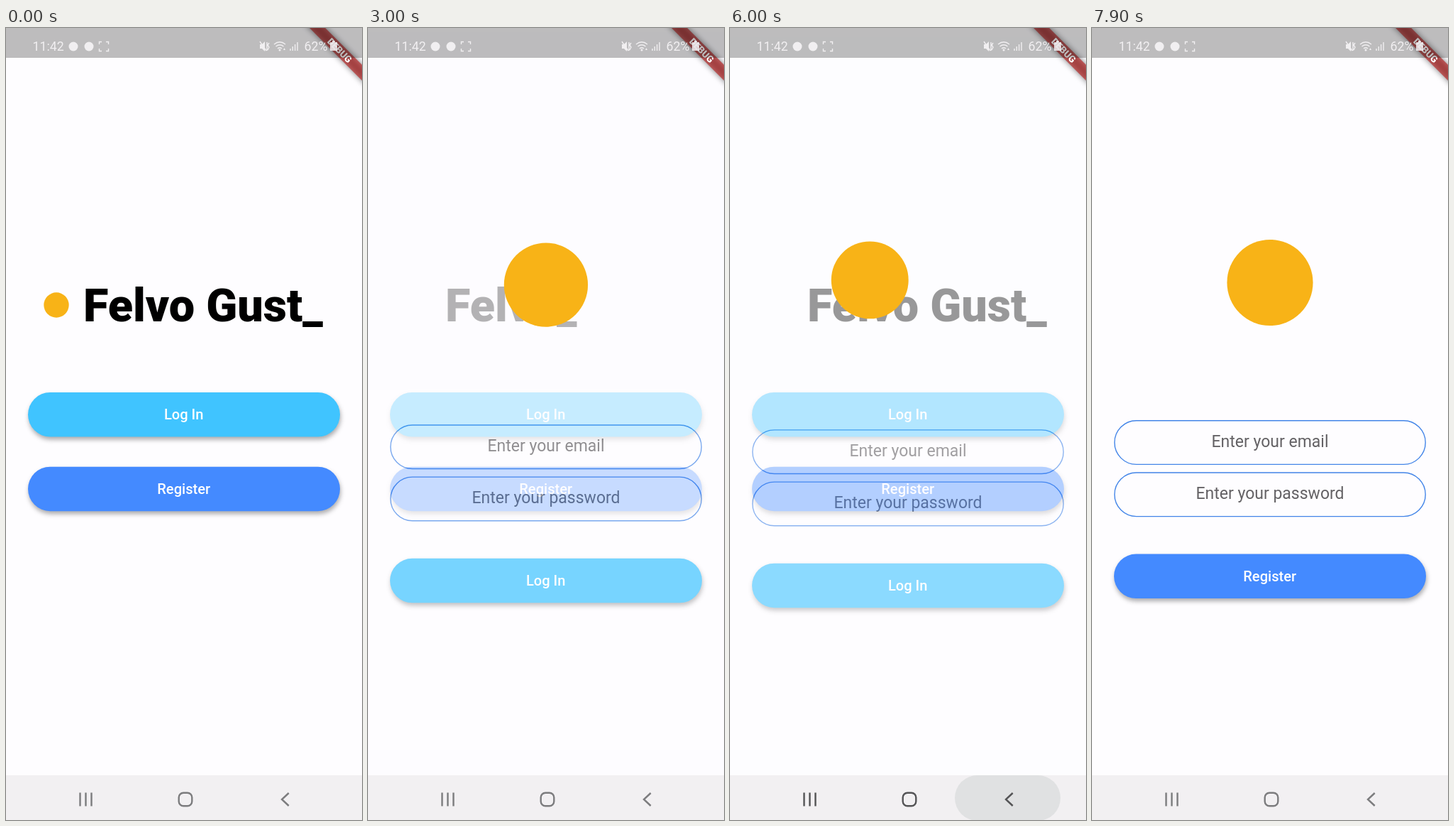
Recreate the animation shown at these times as an HTML page. Size 502 by 1115 pixels, loop 8000 ms.

```html
<!DOCTYPE html>
<html lang="en">
<head>
<meta charset="utf-8">
<title>Chat app sign-in</title>
<style>
  html, body { margin: 0; width: 100%; height: 100%; overflow: hidden; background: #fefdff; }
  svg { display: block; width: 100%; height: 100%; font-family: Roboto, sans-serif; }
  .bg { fill: #fefdff; }
  .button { filter: drop-shadow(1px 4px 3px rgba(0, 0, 0, .32)); }
  .cyan { fill: #40c4ff; }
  .blue { fill: #448aff; }
  .label { fill: #fff; font-size: 20.1px; font-weight: 500; text-anchor: middle; }
  .field { fill: none; stroke: #4385e8; stroke-width: 1.4; }
  .hint { fill: #646265; font-size: 23px; text-anchor: middle; }
  #title { font-size: 64.7px; font-weight: 900; }
  #logo { fill: #f8b317; }
  .status { fill: #f1eff1; font-size: 17.8px; }
  .thin { fill: none; stroke: #f1eff1; stroke-width: 1.4; }
  #nav { fill: none; stroke-width: 2.4; }
</style>
</head>
<body>
<svg viewBox="0 0 502 1115" preserveAspectRatio="none">
  <defs>
    <clipPath id="inkClip"><rect x="31" y="622" width="440" height="55" rx="27"/></clipPath>
    <filter id="soft" x="-20%" y="-150%" width="140%" height="400%"><feGaussianBlur stdDeviation="4"/></filter>
  </defs>

  <rect class="bg" width="502" height="1115"/>
  <g id="welcome">
    <text id="title" x="109" y="413"></text>
    <rect class="button cyan" x="31" y="513" width="440" height="62.5" rx="31.2"/>
    <text class="label" x="250.7" y="551">Log In</text>
    <rect class="button blue" x="31" y="617.7" width="440" height="62.5" rx="31.2"/>
    <circle id="ink" cx="252.5" cy="649" fill="#fff" clip-path="url(#inkClip)"/>
    <text class="label" x="250.7" y="656">Register</text>
  </g>

  <g id="form">
    <rect class="bg" width="502" height="1115"/>
    <rect class="field" x="31.8" y="552.8" width="438.4" height="61.6" rx="30.8"/>
    <text class="hint" x="251" y="589.5">Enter your email</text>
    <rect class="field" x="31.8" y="626" width="438.4" height="61.6" rx="30.8"/>
    <text class="hint" x="251" y="662.5">Enter your password</text>
    <rect id="submit" class="button" x="31" y="740.6" width="440" height="62.5" rx="31.2"/>
    <text id="submitLabel" class="label" x="250.7" y="778.5"></text>
  </g>

  <circle id="logo"/>

  <g transform="translate(502 0) rotate(45)">
    <rect x="-60" y="36.6" width="120" height="15.7" opacity=".5" filter="url(#soft)"/>
    <rect x="-60" y="36.6" width="120" height="15.7" fill="#b71c1c" opacity=".63"/>
    <text y="49.2" fill="#fff" font-size="13.3" font-weight="900" text-anchor="middle">DEBUG</text>
  </g>

  <rect width="502" height="42" opacity=".26"/>
  <g class="status">
    <text x="37.5" y="32">11:42</text>
    <circle cx="95" cy="26" r="6.5"/>
    <circle cx="117" cy="26" r="6.5"/>
    <path class="thin" d="M131.5 23v-3.5h3.5M141 19.5h3.5v3.5M144.5 29v3.5h-3.5M135 32.5h-3.5v-3.5"/>
    <g id="rec">
      <rect class="thin" x="134.2" y="23.5" width="5" height="5" rx="1"/>
      <path d="M139 26l2.5-2v4z"/>
    </g>
    <path d="M358 23h3l4-4v14l-4-4h-3z"/>
    <path class="thin" d="M358 19l9 13M368 20v12M371 21l-2 3 2 3-2 4"/>
    <path class="thin" d="M378 23q8-6.5 16 0M380.5 26q5.500-4.5 11 0M383 29q3-2.5 6 0"/>
    <circle cx="386" cy="31" r="1.5"/>
    <path d="M391 31l1.5-3 1.5 3z"/>
    <path class="thin" d="M401 32v-3M404.3 32v-6M407.6 32v-9M411 32V20"/>
    <text x="420.5" y="32">62%</text>
    <path d="M457 20h3v-2h4v2h3v12h-10z" opacity=".85"/>
  </g>

  <rect y="1052" width="502" height="63" fill="#f2f0f2"/>
  <rect id="press" x="317" y="1052" width="149" height="64" rx="32" fill="#e0e1e2"/>
  <g id="nav">
    <path d="M104.5 1076.500v19M112.5 1076.5v19M120.5 1076.5v19"/>
    <rect x="243.7" y="1076.7" width="18.6" height="18.6" rx="6.5"/>
    <path d="M398.7 1077l-9.700 9 9.700 9"/>
  </g>
</svg>

<script>
const LOOP = 8000, STEP = 100, FADE = 300, TYPE = 400;
const NAME = 'Felvo Gust';
const RISE = 1115 / 4;
const LOGIN = 2757, BACK = 5920, SIGNUP = 7127;
const CLEAR = [300, 6700];
const SMALL = { x: 71, y: 390, h: 68 };
const BIG = { x: 251, y: 358.5, h: 233 };

const el = id => document.getElementById(id);
const set = (id, attrs) => {
  for (const key in attrs) el(id).setAttribute(key, attrs[key]);
};
const clamp = v => Math.min(1, Math.max(0, v));
const ramp = (t, from, to) => clamp((t - from) / (to - from));
const mix = (a, b, p) => a + (b - a) * p;

function bezier(x1, y1, x2, y2) {
  const at = (a, b, s) => 3 * (1 - s) ** 2 * s * a + 3 * (1 - s) * s * s * b + s ** 3;
  return x => {
    if (x <= 0 || x >= 1) return clamp(x);
    let lo = 0, hi = 1;
    for (let i = 0; i < 24; i++) {
      const mid = (lo + hi) / 2;
      if (at(x1, x2, mid) < x) lo = mid; else hi = mid;
    }
    return at(y1, y2, lo);
  };
}
const slide = bezier(.4, 0, .2, 1);
const fadeIn = bezier(.42, 0, 1, 1);

// How far the form has opened, 0 to 1; the screen stalls until 3000 on the first opening.
function opened(t) {
  if (t < 3000) return 0;
  if (t < BACK) return ramp(t, LOGIN, LOGIN + FADE);
  if (t < SIGNUP) return 1 - ramp(t, BACK, BACK + FADE);
  return ramp(t, SIGNUP, SIGNUP + FADE);
}

// Typing restarts at each clear and stalls on the fifth letter before the form opens.
function letters(t) {
  if (t >= CLEAR[1]) return Math.floor((t - CLEAR[1]) / TYPE);
  if (t < CLEAR[0] || t >= LOGIN + 2 * FADE) return NAME.length;
  return Math.min(5, Math.floor((t - CLEAR[0]) / TYPE));
}

// The logo flies along an arc, leaving mostly sideways from either end.
function moveLogo(from, to, progress) {
  const s = slide(progress) ** 1.52;
  set('logo', {
    cx: mix(from.x, to.x, 1 - (1 - s) ** 2.3),
    cy: mix(from.y, to.y, s - 2.1 * s * (1 - s)),
    r: mix(from.h, to.h, s) * .26
  });
}

function draw(t) {
  const open = opened(t);
  const closing = t >= BACK && t < SIGNUP;
  const signUp = t >= CLEAR[1];
  const n = letters(t);

  el('title').textContent = n ? NAME.slice(0, n) + '_' : '';
  set('form', {
    opacity: fadeIn(open),
    transform: `translate(0 ${RISE * (1 - slide(open))})`
  });
  set('submit', { class: 'button ' + (signUp ? 'blue' : 'cyan') });
  el('submitLabel').textContent = signUp ? 'Register' : 'Log In';

  if (closing) moveLogo(BIG, SMALL, 1 - open);
  else moveLogo(SMALL, BIG, open);

  set('ink', {
    r: mix(20, 87.5, ramp(t, 7000, 7200)) + 60 * ramp(t, 7200, 7400),
    opacity: t < 7050 ? 0 : .17 * (1 - ramp(t, 7200, 7450))
  });
  set('rec', { opacity: t % 1000 >= 100 && t % 1000 < 600 ? 1 : 0 });
  set('press', { opacity: t < 5900 ? 0 : 1 - ramp(t, 6000, 6215) });

  const dark = t < 5900 ? 0 : 1 - ramp(t, 7200, 7900);
  const shade = Math.round(mix(124, 84, dark));
  set('nav', { stroke: `rgb(${shade},${shade},${shade + 2})` });
}

const start = performance.now();
function tick() {
  const t = (performance.now() - start) % LOOP;
  draw(Math.floor((t + 15) / STEP) * STEP % LOOP);
  requestAnimationFrame(tick);
}
tick();
</script>
</body>
</html>
```
